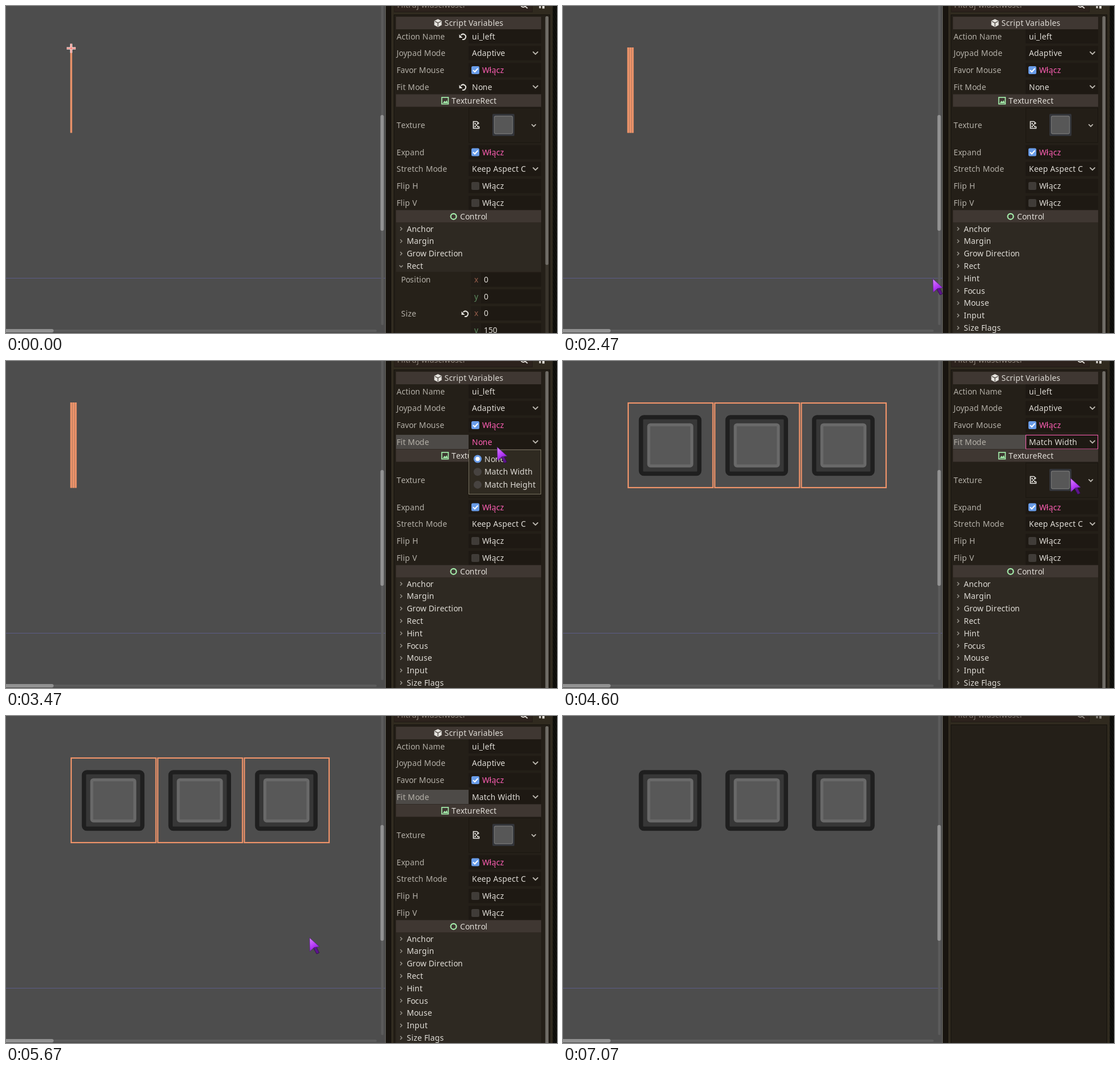
Animation, 972 px wide and 576 px high, one loop 7.87 s. Source, as an HTML page:

```html
<!DOCTYPE html>
<html lang="pl">
<head>
<meta charset="utf-8">
<title>Inspector animation</title>
<style>
  html, body { margin: 0; width: 100%; height: 100%; overflow: hidden; background: #4d4d4d; }
  svg { display: block; width: 972px; height: 576px; }
  text { font: 13.9px "Noto Sans", "Open Sans", sans-serif; font-kerning: none; white-space: pre; }
</style>
</head>
<body>
<svg id="stage" viewBox="0 0 972 576" xmlns="http://www.w3.org/2000/svg">
  <defs>
    <pattern id="weave" width="4" height="8" patternUnits="userSpaceOnUse">
      <rect width="4" height="8" fill="#0d0c09"/>
      <path d="M0 0l2 4M2 4l2 4" stroke="#151610"/>
    </pattern>
    <linearGradient id="violet" x1="0" y1="0" x2="0.5" y2="1">
      <stop offset="0" stop-color="#d887ff"/>
      <stop offset="0.6" stop-color="#b63cf8"/>
      <stop offset="1" stop-color="#8a1fd0"/>
    </linearGradient>
  </defs>
</svg>
<script>
const LOOP = 7870;
const ZOOM = 0.99;
const C = {
  label: '#b3afa7', value: '#dfdcd6', pink: '#ff5fb4', blue: '#699ce8', green: '#a5efac',
  panel: '#241f18', field: '#1e1913', header: '#3f3732', group: '#2e2922', orange: '#f0946a',
  icon: '#e4e2dd'
};
const stage = document.getElementById('stage');
const ruler = document.createElement('canvas').getContext('2d');
ruler.font = '14px "Noto Sans", "Open Sans", sans-serif';

function add(parent, tag, attrs, content) {
  const el = document.createElementNS('http://www.w3.org/2000/svg', tag);
  for (const k in attrs) el.setAttribute(k, attrs[k]);
  if (content !== undefined) el.textContent = content;
  parent.appendChild(el);
  return el;
}
const rect = (p, x, y, width, height, fill, more) => add(p, 'rect', { x, y, width, height, fill, ...more });
const line = (p, d, stroke, w = 1.5, more) => add(p, 'path', { d, stroke, 'stroke-width': w, fill: 'none', ...more });
const disc = (p, cx, cy, r, fill) => add(p, 'circle', { cx, cy, r, fill });

// Text is placed by the middle of its capitals; letters advance by whole interface pixels.
function text(p, x, mid, str, fill = C.value) {
  let pen = x;
  const xs = [...str].map(ch => {
    const at = pen;
    pen += Math.round(ruler.measureText(ch).width) * ZOOM;
    return at.toFixed(2);
  });
  return add(p, 'text', { x: xs.join(' '), y: mid + 5, fill }, str);
}

// Groups shown only during [from, to) spans.
const timed = [];
function during(parent, ...spans) {
  const g = add(parent, 'g', {});
  timed.push({ g, spans });
  return g;
}

// ---- viewport ----
rect(stage, 0, 0, 670, 576, '#4d4d4d');
rect(stage, 0, 479, 669, 1, '#5b5b86');

function key(p, x) {
  rect(p, x + 23, 99, 103, 99.5, '#373737', { rx: 5, stroke: '#1f1f1f', 'stroke-width': 7.5 });
  rect(p, x + 36.7, 112.3, 76, 72.5, '#585858', { rx: 3, stroke: '#696969', 'stroke-width': 5.2 });
}
function bar(p, x) {
  rect(p, x - 1.65, 73, 3.3, 150.5, C.orange);
}
function marker(p, x) {
  const d = `M${x} 66.5V82.5M${x - 8} 74.5H${x + 8}`;
  line(p, d, '#fbe6e3', 4);
  line(p, d, '#f2756d', 1.4);
}

const slots = [115, 267.7, 420.5];
const keys = during(stage, [4600, LOOP]);
slots.forEach(x => key(keys, x - 0.5));
const frames = during(stage, [4600, 6530]);
slots.forEach(x => rect(frames, x, 74, 149.5, 149, 'none', { stroke: C.orange, 'stroke-width': 2.2 }));

[[115, 0, 200], [119, 200, 1330], [123, 1330, 2000]].forEach(([x, from, to]) => {
  const g = during(stage, [from, to]);
  bar(g, x);
  marker(g, x);
});
const trio = during(stage, [2000, 4600]);
[115, 119, 123].forEach(x => bar(trio, x));
rect(trio, 114, 73, 10, 150.5, C.orange, { opacity: 0.35 });

rect(stage, 661.5, -4, 4.5, 566, '#5b5b5b', { rx: 2 });
rect(stage, 660.5, 192, 6, 204, '#929292', { rx: 3 });
rect(stage, -4, 570, 658, 4, '#5b5b5b', { rx: 2 });
rect(stage, -4, 569, 88, 6, '#929292', { rx: 3 });

// ---- dock frame ----
rect(stage, 669, 0, 303, 576, '#18140f');
rect(stage, 669, 0, 1, 576, '#66655f');
rect(stage, 680, 0, 285, 576, '#302a1f');
rect(stage, 680, 0, 1, 576, '#3a3427');
rect(stage, 964.5, 0, 7.5, 576, 'url(#weave)');
rect(stage, 684.5, 15.5, 275, 570, C.panel, { stroke: '#15120d' });
rect(stage, 685, -6, 243.5, 16.5, '#2c221c', { stroke: '#221c16' });

function topBar(p, ink, icon) {
  text(p, 690, -2, 'Filtruj właściwości', ink);
  add(p, 'circle', { cx: 912.5, cy: -2, r: 4, fill: 'none', stroke: icon, 'stroke-width': 2 });
  line(p, 'M915 0l5 4', icon, 2);
  line(p, 'M942 -2V4', icon, 3);
  line(p, 'M948 -2V4.5', icon, 4);
}
topBar(during(stage, [0, 6530]), '#8b8379', '#dcd9d3');
topBar(during(stage, [6530, LOOP]), '#77706a', '#85817a');

// ---- inspector ----
const panel = during(stage, [0, 6530]);

function header(y, x, title) {
  rect(panel, 688, y, 256, 22, C.header);
  text(panel, x, y + 11, title);
}
const chevron = (p, x, y, r = 4) =>
  line(p, `M${x - r} ${y - r / 2}l${r} ${r}l${r} ${-r}`, '#bcb8b0', 1.8, { 'stroke-linecap': 'round' });
const field = (p, mid) => rect(p, 816, mid - 12.5, 128, 25, C.field);

function row(mid, name) {
  text(panel, 689, mid, name, C.label);
  field(panel, mid);
}
function check(mid, name, on) {
  row(mid, name);
  rect(panel, 821, mid - 7, 14, 14, on ? C.blue : '#403c38', { rx: 2.5 });
  if (on) line(panel, `M824 ${mid}l3 3l5.5 -6`, '#fff', 2);
  text(panel, 840, mid, 'Włącz', on ? C.pink : C.value);
}
function choice(mid, name, value) {
  row(mid, name);
  if (value) text(panel, 822, mid, value);
  chevron(panel, 934, mid);
}
function revert(p, x, y) {
  line(p, `M${x - 3.5} ${y - 2.5}A4.7 4.7 0 1 1 ${x - 1} ${y + 4.8}`, C.icon, 2);
  add(p, 'path', { d: `M${x - 6.5} ${y - 4}v6h6z`, fill: C.icon });
}

header(19, 773.5, 'Script Variables');
add(panel, 'path', { d: 'M762 23l6.5 3.3v7.4l-6.5 3.3l-6.5 -3.3v-7.4z', fill: C.icon });
line(panel, 'M756.5 27l5.5 2.8l5.5 -2.8M762 30v6', C.header, 1.2);

row(53.5, 'Action Name');
text(panel, 822, 53.5, 'ui_left');
choice(83, 'Joypad Mode', 'Adaptive');
check(113, 'Favor Mouse', true);

const fitGlow = during(panel, [3470, 6530]);
rect(fitGlow, 688, 130, 128, 25, '#4d4a47');
choice(142.5, 'Fit Mode');
[[C.value, 'None', 0, 3270], [C.pink, 'None', 3270, 4600], [C.value, 'Match Width', 4600, 6530]]
  .forEach(([ink, str, from, to]) => text(during(panel, [from, to]), 822, 142.5, str, ink));
rect(during(panel, [4600, 5270]), 816.5, 130.5, 127, 24.5, 'none', { stroke: C.pink });

const reverts = during(panel, [0, 2000]);
revert(reverts, 806, 54);
revert(reverts, 806, 143);

header(155.5, 786, 'TextureRect');
rect(panel, 768.7, 161, 11.6, 11.6, 'none', { stroke: C.green, 'stroke-width': 1.7 });
add(panel, 'path', { d: 'M770.5 171l3 -4l2 2l2 -3l2 5z', fill: C.green });

text(panel, 689, 209.5, 'Texture', C.label);
rect(panel, 816.5, 179.5, 127, 61, '#231e17', { stroke: '#1a1610' });
line(panel, 'M831 203.5H824.5V215.5H834.5V212M831 203.5L834.5 207', C.icon, 1.7);
for (let i = 0; i < 9; i += 2) rect(panel, 826.5 + (i % 3) * 2.3, 206 + Math.floor(i / 3) * 2.5, 2.3, 2.5, C.icon);
rect(panel, 858, 190, 39, 39, '#33353a', { rx: 2 });
rect(panel, 861.5, 194, 32, 31, '#575757', { rx: 2.5, stroke: '#737373', 'stroke-width': 1.3 });
chevron(panel, 931, 210.5, 3.3);

check(257.5, 'Expand', true);
choice(287, 'Stretch Mode', 'Keep Aspect C');
check(317, 'Flip H', false);
check(347, 'Flip V', false);

header(359.5, 801, 'Control');
add(panel, 'circle', { cx: 789.5, cy: 370.8, r: 5, fill: 'none', stroke: C.green, 'stroke-width': 2.2 });

function groups(p, names, opened) {
  rect(p, 688, 381.5, 256, names.length * 21.8, C.group);
  names.forEach((name, i) => {
    const y = 392.5 + i * 21.8;
    const d = name === opened ? `M694 ${y - 1}l3 3l3 -3` : `M695.5 ${y - 3}l3 3l-3 3`;
    line(p, d, '#938f87', 1.5);
    text(p, 707, y, name);
  });
}
const names = ['Anchor', 'Margin', 'Grow Direction', 'Rect', 'Hint', 'Focus', 'Mouse', 'Input', 'Size Flags'];

const opened = during(panel, [0, 200]);
groups(opened, names.slice(0, 4), 'Rect');
rect(opened, 688, 468.5, 256, 108, '#262119');
[['x', '0'], ['y', '0'], ['x', '0'], ['y', '150']].forEach(([axis, value], i) => {
  const y = 482 + i * 29.7;
  rect(opened, 820, y - 12.5, 124, 25, C.field);
  rect(opened, 820, y - 12.5, 18, 25, '#221d17');
  text(opened, 826, y, axis, axis === 'x' ? '#955c4a' : '#5d8c60');
  text(opened, 843, y, value);
});
text(opened, 697, 482, 'Position', C.label);
text(opened, 697, 541.5, 'Size', C.label);
revert(opened, 810, 542);
groups(during(panel, [200, 6530]), names);

rect(panel, 951.5, 18, 5.5, 560, '#3a352d', { rx: 2.5 });
rect(during(panel, [0, 200]), 951.5, 18, 5.5, 438, '#6f6c66', { rx: 2.5 });
rect(during(panel, [200, 6530]), 951.5, 18, 5.5, 570, '#6f6c66', { rx: 2.5 });

// ---- drop-down list ----
const popup = during(stage, [3470, 4600]);
rect(popup, 816.5, 156.5, 127, 78, '#2f2a21', { stroke: '#77715f' });
['None', 'Match Width', 'Match Height'].forEach((name, i) => {
  const y = 172.5 + i * 22.7;
  disc(popup, 832, y, 7, i ? '#474340' : C.blue);
  if (!i) disc(popup, 832, y, 3.8, '#fff');
  text(popup, 844, y, name);
});
text(during(popup, [3930, 4600]), 844, 195.2, 'Match Width', C.pink);

// ---- pointer: start time, x, y; a lone time hides it ----
const path = [
  [0], [2330, 628, 556], [2400, 638, 520], [2470, 652, 480], [2530, 757, 387],
  [2730, 753, 370], [2800, 766, 325], [2870, 788, 272], [3000, 815, 222], [3070, 838, 183], [3130, 851, 162],
  [3270, 856, 157], [3330, 861, 153], [3400, 865, 151], [3470, 866, 151], [3530, 866, 152],
  [3800, 868, 160], [3870, 874, 175], [3930, 884, 193], [4000, 891, 202],
  [4200, 895, 202], [4400, 895, 206], [4800, 893, 205],
  [5000, 860, 212], [5070, 800, 219], [5130, 721, 225], [5200, 590, 285], [5270, 450, 350], [5330, 364, 395],
  [5530, 354, 404], [5600, 420, 402], [5670, 535, 390], [5730, 650, 370], [5800, 718, 348],
  [5870, 690, 332], [5930, 620, 322], [6000, 550, 317], [6070, 490, 314], [6130, 460, 313],
  [6870, 380, 285], [6930, 240, 235], [7000, 85, 187], [7070]
];
const pointer = add(stage, 'g', {});
add(pointer, 'path', { d: 'M7 18l5 -2l5.5 11l-4.5 2z', fill: '#5c148c', stroke: '#2e0b45', 'stroke-width': 0.8 });
add(pointer, 'path', { d: 'M0.5 0.5L18 16.5L9 17.5L1 24.5z', fill: 'url(#violet)', stroke: '#54217a', 'stroke-width': 0.8, 'stroke-linejoin': 'round' });

function draw(t) {
  for (const { g, spans } of timed) {
    g.style.display = spans.some(([from, to]) => t >= from && t < to) ? '' : 'none';
  }
  const [, x, y] = path.filter(step => step[0] <= t).pop();
  pointer.style.display = x === undefined ? 'none' : '';
  if (x !== undefined) pointer.setAttribute('transform', `translate(${x} ${y})`);
}

const start = performance.now();
function tick() {
  draw((performance.now() - start) % LOOP);
  requestAnimationFrame(tick);
}
tick();
</script>
</body>
</html>
```
